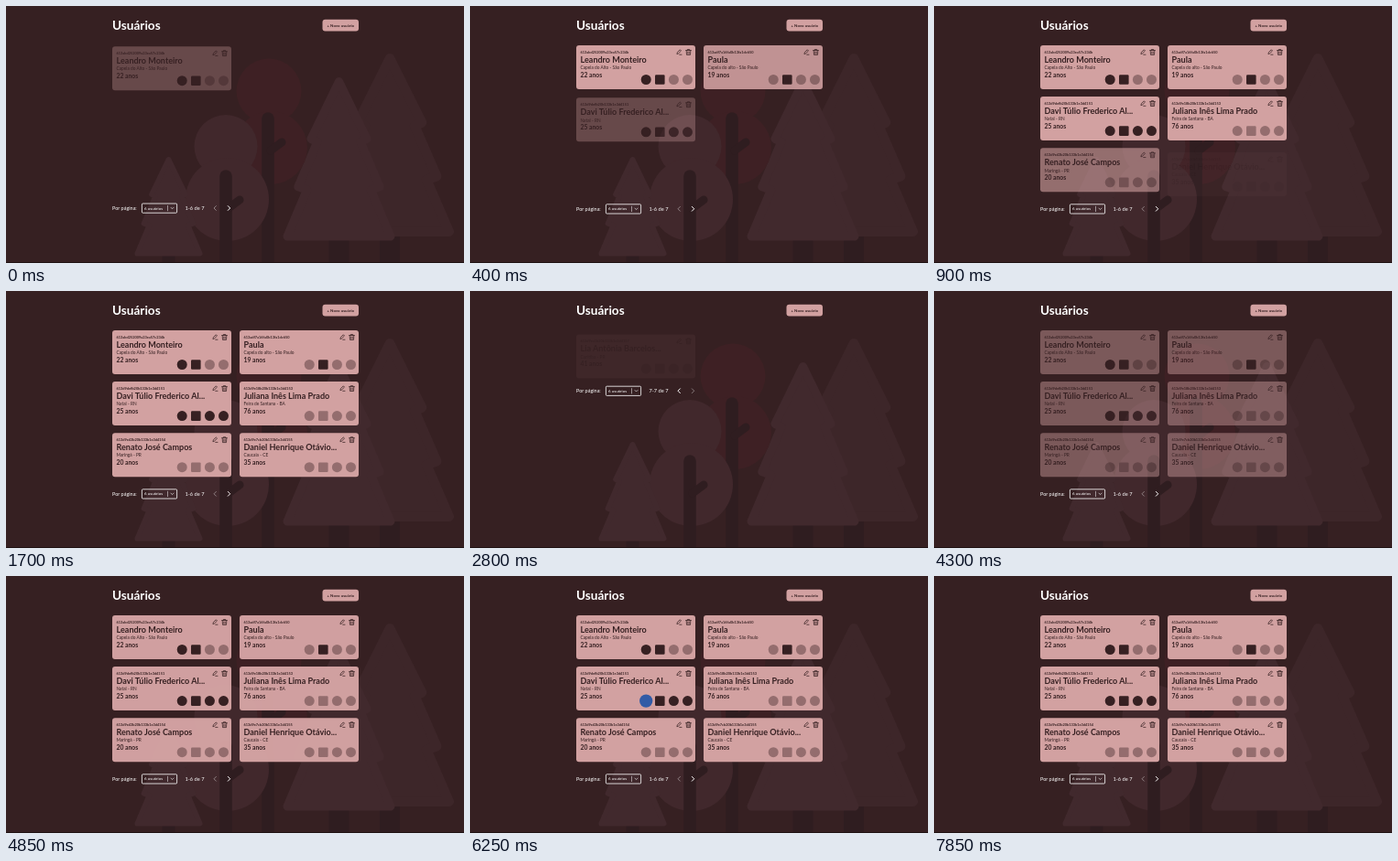
Recreate the animation shown at these times as an HTML page. Size 500x281 px, loop 8000 ms.

```html
<!DOCTYPE html>
<html lang="pt-BR">
<head>
<meta charset="utf-8">
<title>Usuários</title>
<style>
  html, body { margin: 0; width: 100%; height: 100%; overflow: hidden; background: #362022; }
  svg { display: block; width: 100vw; height: 100vh; font-family: Lato, "Open Sans", sans-serif; }
</style>
</head>
<body>
<svg id="stage" viewBox="0 0 500 281"></svg>
<script>
const DARK = '#362022', PINK = '#d2a1a1', LOOP = 8000;
const stage = document.getElementById('stage');

function add(parent, tag, attrs, text) {
  const el = document.createElementNS('http://www.w3.org/2000/svg', tag);
  set(el, attrs);
  if (text) el.textContent = text;
  parent.appendChild(el);
  return el;
}
function set(el, attrs) {
  for (const k in attrs) el.setAttribute(k, attrs[k]);
}
const clamp = v => Math.max(0, Math.min(1, v));
const label = (g, x, y, size, weight, fill, text, anchor = 'start') =>
  add(g, 'text', { x, y, 'font-size': size, 'font-weight': weight, fill, 'text-anchor': anchor }, text);
const line = (g, d, stroke, width) =>
  add(g, 'path', { d, fill: 'none', stroke, 'stroke-width': width, 'stroke-linecap': 'round', 'stroke-linejoin': 'round' });
const box = (g, x, y, width, height, rx, fill) => add(g, 'rect', { x, y, width, height, rx, fill });
const disc = (g, cx, cy, r, fill) => add(g, 'circle', { cx, cy, r, fill });

// Forest
const TRUNK = '#2f1d20';
function pine(x, top, base, half, trunk, fill) {
  const r = half / 13, w = half - r, h = base - top - 2 * r;
  const side = [[0, 0], [.54, .37], [.42, .39], [.79, .68], [.62, .70], [1, 1]];
  const at = s => ([u, v]) => `${x + s * u * w},${top + r + v * h}`;
  const points = [...side.map(at(1)), ...side.slice(1).reverse().map(at(-1))].join(' ');
  box(stage, x - trunk / 2, base - 2, trunk, 283 - base, 0, TRUNK);
  add(stage, 'polygon', { points, fill, stroke: fill, 'stroke-width': 2 * r, 'stroke-linejoin': 'round' });
}
function roundTree(x, y1, r1, x2, y2, r2, top, fill) {
  disc(stage, x, y1, r1, fill);
  disc(stage, x2, y2, r2, fill);
  const tx = x - (x > 260 ? 1 : 0);
  line(stage, `M${tx} ${top + 7}V290`, TRUNK, 13.5);
  line(stage, `M${tx + 3} ${top + 42}L${tx + 15} ${top + 33}`, TRUNK, 9);
}
box(stage, 0, 0, 500, 281, 0, DARK);
pine(419, 52, 252, 70, 22, '#3d2629');
pine(363.5, 78, 256.5, 61, 22, '#41292d');
roundTree(287, 93, 35.5, 289, 155, 40, 116, '#3e2024');
roundTree(240, 153.5, 34.5, 241.5, 211.5, 45.5, 179, '#41282c');
pine(177.5, 165, 273.5, 37, 14, '#41292d');
box(stage, 0, 280, 500, 1, 0, '#1f1213');

// Header
label(stage, 116, 25.6, 13.6, 700, '#fff', 'Usuários');
box(stage, 345.5, 14.8, 39.5, 12.7, 3, PINK);
label(stage, 365.3, 22.7, 4.4, 700, DARK, '+ Novo usuário', 'middle');

// Cards: id, name, city, age, linked networks
const first = [
  ['613abd252009a23ea57c234b', 'Leandro Monteiro', 'Capela do Alto - São Paulo', 22, '1100'],
  ['613adf7a16fa0b13fa1dc650', 'Paula', 'Capela do alto - São Paulo', 19, '0100'],
  ['613d9defb20b133b1e3d4151', 'Davi Túlio Frederico Al...', 'Natal - RN', 25, '1111'],
  ['613d9e18b20b133b1e3d4153', 'Juliana Inês Lima Prado', 'Feira de Santana - BA', 76, '0000'],
  ['613d9e43b20b133b1e3d4154', 'Renato José Campos', 'Maringá - PR', 20, '0000'],
  ['613d9e7cb20b133b1e3d4155', 'Daniel Henrique Otávio...', 'Caucaia - CE', 35, '0000']
];
const second = [['613d9ea1b20b133b1e3d4157', 'Lia Antônia Barcelos...', 'Curitiba - PR', 41, '0000']];
const BRAND = ['#315ba6', '#2a6ca8', '#3a94d0', '#b5426a'];

function makeCard([id, name, city, age, links], i) {
  const x = 116 + (i % 2) * 139, y = 43 + Math.floor(i / 2) * 56.1;
  const g = add(stage, 'g', {});
  const c = add(g, 'g', { transform: `translate(${x} ${y})` });
  box(c, 0, 0, 130, 48, 3, PINK);
  label(c, 4.5, 8.6, 3.9, 700, DARK, id);
  label(c, 4.5, 18.6, 9.05, 700, DARK, name);
  label(c, 4.5, 26.3, 4.8, 400, DARK, city);
  label(c, 4.5, 34.7, 6.8, 700, DARK, age + ' anos');
  line(c, 'M110 9.2L110.4 7.5L113.3 4.8L114.5 6L111.6 8.8ZM112.7 10.2H115', DARK, .75);
  line(c, 'M119.6 5.5H125.4M121.3 5.3V4.5H123.7V5.3M120.2 5.7L120.5 10.4H124.5L124.8 5.7M121.8 7V9.2M123.2 7V9.2', DARK, .75);
  const icons = [...links].map((on, k) => {
    const b = add(c, 'g', { transform: `translate(${76.2 + k * 15.1} 37.5)`, opacity: on === '1' ? 1 : .4 });
    return k === 1 ? box(b, -5.3, -5.3, 10.6, 10.6, 1.2, DARK) : disc(b, 0, 0, 5.5, DARK);
  });
  return { g, icons };
}
const pageOne = first.map(makeCard), pageTwo = second.map(makeCard);

// Pagination, drawn around y = 0
const pager = add(stage, 'g', {});
label(pager, 116, 1.7, 5.5, 400, '#fff', 'Por página:');
set(box(pager, 148.4, -5, 38.2, 10.2, 1, 'none'), { stroke: '#fff', 'stroke-width': .8 });
label(pager, 151, 1.5, 4.5, 400, '#fff', '6 usuários');
line(pager, 'M176.5 -2.6V2.8', '#fff', .5);
line(pager, 'M180 -.7L181.5 .8L183 -.7', '#fff', .6);
const range = label(pager, 195.4, 1.8, 5.7, 400, '#fff', '1-6 de 7');
const prev = line(pager, 'M229.4 -2.4L227 0L229.4 2.4', '#fff', 1);
const next = line(pager, 'M242.3 -2.4L244.7 0L242.3 2.4', '#fff', 1);

// Pointer stops: card, icon, enter, leave
const stops = [
  [0, 0, 5150, 5420], [0, 1, 5420, 5720],
  [2, 0, 5850, 6330], [2, 1, 6330, 6520], [2, 2, 6520, 6720]
];
const mix = (a, b, p) => '#' + [1, 3, 5].map(i => {
  const u = parseInt(a.slice(i, i + 2), 16), v = parseInt(b.slice(i, i + 2), 16);
  return Math.round(u + (v - u) * p).toString(16).padStart(2, '0');
}).join('');
const pulse = (t, on, off, d = 150) => clamp((t - on) / d) - clamp((t - off) / d);

function place(card, opacity, dy) {
  set(card.g, { opacity, transform: `translate(0 ${dy})` });
}
const enter = (card, t, start) => {
  const p = clamp((t - start) / 350);
  place(card, p, 5.5 * (1 - p) ** 4);
};

function draw(t) {
  const onTwo = t >= 2795 && t < 4245;
  pageOne.forEach((card, i) => {
    if (onTwo) place(card, 0, 0);
    else if (t < 2795) enter(card, t, -110 + 200 * i);
    else place(card, t > 5060 ? 1 : 1 - Math.exp(-(t - 4225) / 130), 0);
  });
  if (onTwo) enter(pageTwo[0], t, 2782);
  else place(pageTwo[0], 0, 0);

  const y = onTwo ? 109.2 : 221 + .8 * clamp(t / 200);
  set(pager, { transform: `translate(0 ${y})` });
  const last = t >= 2000 && t < 4000;
  range.textContent = last ? '7-7 de 7' : '1-6 de 7';
  set(prev, { opacity: last ? 1 : .4, stroke: mix('#ffffff', PINK, pulse(t, 3720, 4000)) });
  set(next, { opacity: last ? .4 : 1, stroke: mix('#ffffff', PINK, pulse(t, 1680, 2050)) });

  for (const [c, k, on, off] of stops) {
    const p = pulse(t, on, off);
    set(pageOne[c].icons[k], { fill: mix(DARK, BRAND[k], p), transform: `scale(${1 + .3 * p})` });
  }
}
function tick(now) {
  draw(now % LOOP);
  requestAnimationFrame(tick);
}
draw(0);
requestAnimationFrame(tick);
</script>
</body>
</html>
```
